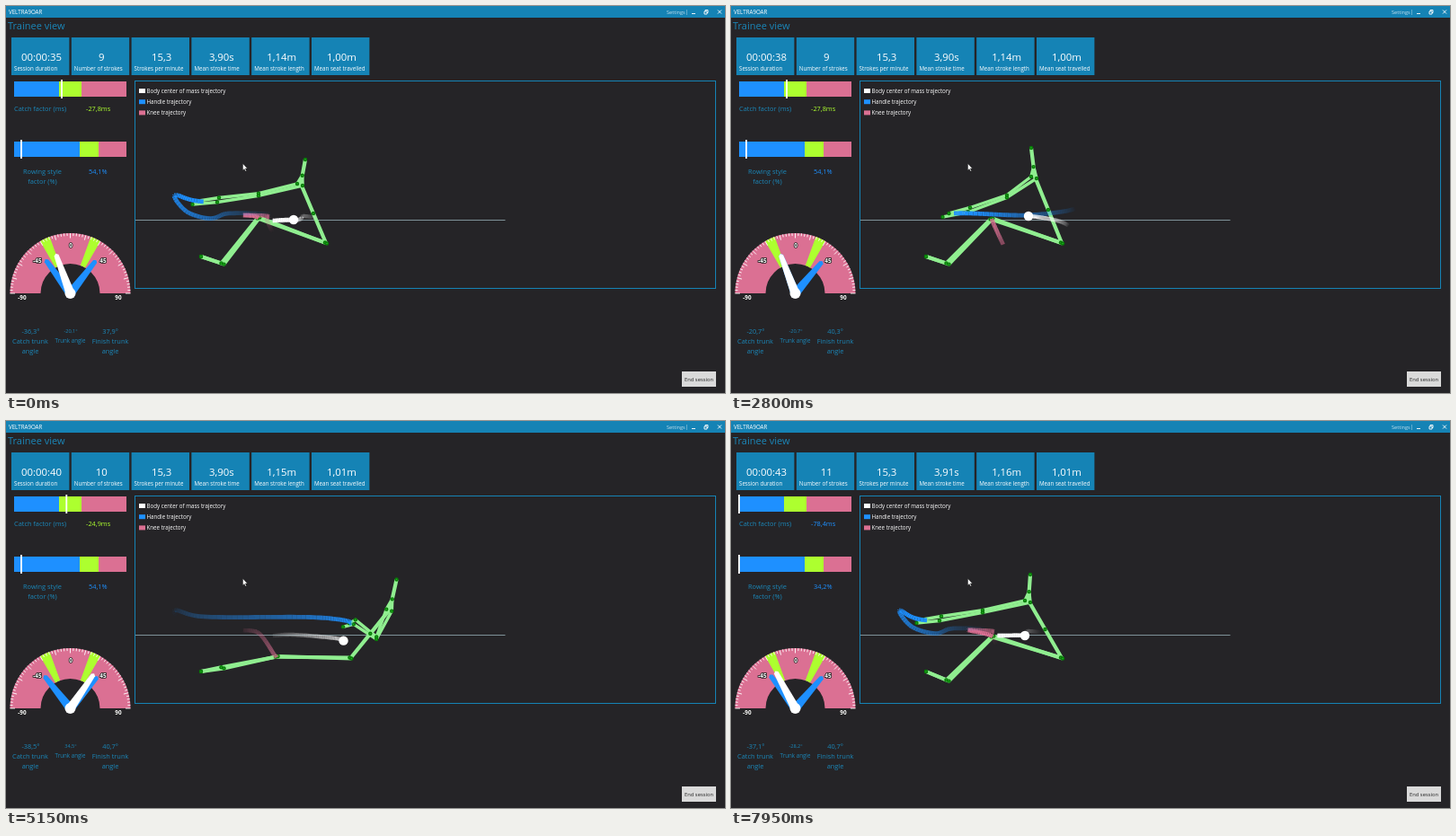
An HTML page with a canvas for the animation above (8 s loop, 800 px wide and 431 px high).

```html
<!DOCTYPE html>
<html lang="en">
<head>
<meta charset="utf-8">
<title>Trainee view</title>
<style>
  html, body { margin: 0; width: 100%; height: 100%; overflow: hidden; background: #252427; }
  svg, canvas { position: absolute; left: 0; top: 0; width: 800px; height: 431px; }
  text { font-family: "Open Sans", "Noto Sans", sans-serif; font-size: 7.4px; fill: #1b87b9; }
  .mid { text-anchor: middle; }
  .white { fill: #fff; }
  .num { font-size: 11.4px; }
  .small { font-size: 6.2px; }
  .tiny { font-size: 5.6px; }
  .dial { font-size: 6.4px; font-weight: 700; fill: #fff; stroke: #222; stroke-width: 1.6px; paint-order: stroke; }
</style>
</head>
<body>
<svg id="ui" viewBox="0 0 800 431"></svg>
<canvas id="chart" width="800" height="431"></canvas>
<script>
const BLUE = '#1e90ff', GREEN = '#adff2f', PINK = '#db7093', ACCENT = '#1583b5';
const LOOP = 8000, STEP = 50, TRAIL = 1650;
const CX = 71.5, CY = 320;

// ---------- static interface ----------
const rect = (x, y, w, h, fill, extra = '') =>
  `<rect x="${x}" y="${y}" width="${w}" height="${h}" fill="${fill}" ${extra}/>`;
const text = (x, y, str, cls = '', id = '') =>
  `<text x="${x}" y="${y}" class="${cls}" ${id && `id="${id}"`}>${str}</text>`;
const polar = (r, deg) => {
  const a = deg * Math.PI / 180;
  return [CX + r * Math.sin(a), CY - r * Math.cos(a)];
};
const sector = (from, to, fill) =>
  `<path fill="${fill}" d="M${polar(67, from)}A67 67 0 0 1 ${polar(67, to)}` +
  `L${polar(33, to)}A33 33 0 0 0 ${polar(33, from)}Z"/>`;
const needle = (id, fill) =>
  `<path id="${id}" fill="${fill}" d="M${CX - 5} ${CY}L${CX - 2.6} ${CY - 45}L${CX} ${CY - 47}L${CX + 2.6} ${CY - 45}L${CX + 5} ${CY}Z"/>`;

function bar(y, greenFrom, greenTo, id) {
  return rect(9, y, greenFrom - 9, 17, BLUE) +
    rect(greenFrom, y, greenTo - greenFrom, 17, GREEN) +
    rect(greenTo, y, 134 - greenTo, 17, PINK) +
    rect(-0.9, y - 2, 1.8, 21, '#fff', `id="${id}"`);
}

function gauge() {
  let out = sector(-90, 90, PINK) + sector(-30, -20, GREEN) + sector(20, 30, GREEN);
  for (let deg = -90; deg <= 90; deg += 3) {
    const inner = deg % 15 ? 64 : 61.5;
    out += `<path stroke="#fff" stroke-width=".9" d="M${polar(inner, deg)}L${polar(67, deg)}"/>`;
  }
  return out + needle('catchNeedle', BLUE) + needle('finishNeedle', BLUE) + needle('trunkNeedle', '#fff') +
    `<circle cx="${CX}" cy="${CY}" r="6" fill="#fff"/>` +
    text(18, 327, '-90', 'dial mid') + text(35, 286, '-45', 'dial mid') + text(72, 269, '0', 'dial mid') +
    text(108, 286, '45', 'dial mid') + text(125, 327, '90', 'dial mid');
}

const tiles = [['clock', 'Session duration'], ['strokes', 'Number of strokes'], ['rate', 'Strokes per minute'],
  ['time', 'Mean stroke time'], ['length', 'Mean stroke length'], ['seat', 'Mean seat travelled']];
const legend = [['#fff', 'Body center of mass trajectory'], [BLUE, 'Handle trajectory'], [PINK, 'Knee trajectory']];

document.getElementById('ui').innerHTML =
  rect(0, 0, 800, 13, ACCENT) +
  text(3, 9, 'VELTRA9OAR', 'small white') +
  `<g opacity=".75">${text(735, 9, 'Settings', 'tiny white')}${rect(757, 4, .6, 6, '#bfe0ee')}</g>` +
  `<g fill="none" stroke="#fff" stroke-width=".9"><path d="M763 8.5h4M792 4.5l4 4m0-4l-4 4"/>
   <path d="M777 6h3v3h-3zM778 6v-1.500h3v3h-1"/></g>` +
  `<text x="2" y="26" style="font-size:11px">Trainee view</text>` +
  tiles.map(([id, label], i) => {
    const x = 6 + i * 66.8;
    return rect(x, 35, 64.4, 42, ACCENT) + text(x + 33.5, 61, '', 'num white mid', id) +
      text(x + 3, 72, label, 'small white');
  }).join('') +
  bar(84, 59, 84, 'catchMark') + text(9, 117, 'Catch factor (ms)') + text(89, 117, '', '', 'catchFactor') +
  bar(151, 82, 103, 'styleMark') + text(40.500, 187, 'Rowing style', 'mid') + text(40.5, 198, 'factor (%)', 'mid') +
  `<text x="92" y="187" id="styleFactor" style="fill:${BLUE}"></text>` +
  gauge() +
  text(27.500, 365, '', 'mid', 'catchAngle') + text(27, 376, 'Catch trunk', 'mid') + text(27, 387, 'angle', 'mid') +
  text(72, 363.5, '', 'mid tiny', 'trunkAngle') + text(71.500, 374.5, 'Trunk angle', 'mid small') +
  text(116, 365, '', 'mid', 'finishAngle') + text(116, 376, 'Finish trunk', 'mid') + text(116, 387, 'angle', 'mid') +
  rect(143.5, 83.5, 646, 231, 'none', `stroke="${ACCENT}"`) +
  legend.map(([fill, label], i) =>
    rect(148, 92 + i * 12.2, 7, 5, fill) + text(156.5, 97 + i * 12.2, label, 'small white')).join('') +
  rect(144, 238, 411.5, 1, '#7f9298') +
  `<path d="M263.500 175.500v7.500l1.700-1.500 1.100 2.500 1.200-.6-1.100-2.400h2.200z" fill="#fff" stroke="#111" stroke-width=".4"/>` +
  rect(752, 407, 38, 17, '#dadada') +
  `<text x="771" y="418" class="mid" style="font-size:5.8px;fill:#222">End session</text>`;

// ---------- motion ----------
// ankle y, hip x, then x,y of knee, shoulder, head, elbow, wrist, hand, centre of mass
const poses = {
  start:   [287, 356, 281, 236, 328, 198, 333, 171, 281, 210, 236, 216, 211, 219, 320, 238],
  restart: [289, 368, 291, 240, 331, 200, 333, 171, 280, 212, 233, 220, 210, 223, 327, 239],
  drive:   [281, 381, 299, 261, 415, 204, 424, 171, 387, 225, 351, 218, 337, 219, 367, 242],
  finish:  [274, 383, 301, 262, 429, 211, 437, 178, 413, 243, 389, 223, 381, 226, 376, 245],
  recover: [288, 385, 302, 264, 397, 192, 398, 157, 383, 218, 347, 229, 321, 235, 363, 239],
  slide:   [287, 368, 290, 237, 338, 190, 334, 158, 307, 212, 265, 227, 239, 233, 331, 234],
  reach:   [289, 369, 292, 234, 327, 200, 324, 169, 290, 221, 237, 236, 221, 237, 326, 238],
  dip:     [288, 357, 274, 233, 309, 204, 307, 173, 266, 218, 216, 229, 193, 229, 307, 239],
  catch:   [287, 349, 264, 233, 297, 206, 298, 176, 249, 212, 205, 211, 178, 211, 297, 239]
};
const timeline = [[-2000, 'recover'], [-1150, 'slide'], [-800, 'reach'], [-580, 'dip'], [-380, 'catch'], [0, 'start'],
  [600, 'drive'], [1100, 'finish'], [1950, 'recover'], [2800, 'slide'], [3130, 'reach'], [3360, 'dip'],
  [3600, 'catch'], [3950, 'start'], [4500, 'drive'], [5050, 'finish'], [5850, 'recover'], [6650, 'slide'],
  [7050, 'reach'], [7300, 'dip'], [7550, 'catch'], [7950, 'restart'], [8500, 'drive']]
  .map(([time, name]) => ({ time, pose: poses[name] }));
const trunkKeys = [[-400, -36.3], [0, -20.1], [600, 29.5], [900, 40.3], [1100, 37.9], [1950, 9.6], [2800, -20.7],
  [3150, -31], [3600, -38.5], [3950, -22], [4500, 29.8], [4850, 40.7], [5050, 38], [5850, 9.6], [6650, -20.7],
  [7050, -31.1], [7550, -37.1], [7950, -28.2], [8500, 29]];

function slope(i, j) {
  const a = timeline[Math.max(i - 1, 0)], b = timeline[Math.min(i + 1, timeline.length - 1)];
  return (b.pose[j] - a.pose[j]) / (b.time - a.time);
}

function poseAt(t) {
  let i = 0;
  while (i < timeline.length - 2 && timeline[i + 1].time <= t) i++;
  const a = timeline[i], b = timeline[i + 1], d = b.time - a.time, u = (t - a.time) / d;
  const v = a.pose.map((p, j) => {
    const q = b.pose[j], h = u * u * (3 - 2 * u);
    return p + (q - p) * h + d * u * (1 - u) * ((1 - u) * slope(i, j) - u * slope(i + 1, j));
  });
  const pt = k => [v[k], v[k + 1]];
  const joints = { toe: [217, 279], ankle: [241, v[0]], hip: [v[1], 264], knee: pt(2), shoulder: pt(4),
    head: pt(6), elbow: pt(8), wrist: pt(10), hand: pt(12), mass: pt(14) };
  joints.handle = mix(joints.hand, joints.wrist, .35);
  return joints;
}

function trunkAt(t) {
  const i = trunkKeys.findIndex(k => k[0] > t);
  const [t0, a] = trunkKeys[i - 1], [t1, b] = trunkKeys[i];
  return a + (b - a) * (t - t0) / (t1 - t0);
}

// Extremes follow the trunk on its way out and hold on its way back.
function trunkState(t) {
  let now = trunkAt(0), catchA = -36.3, finishA = 37.9;
  for (let s = STEP; s <= t; s += STEP) {
    const next = trunkAt(s);
    if (next < 0 && next < now) catchA = next;
    if (next > 0 && next > now) finishA = next;
    now = next;
  }
  return { trunk: now, catch: catchA, finish: finishA };
}

const mix = (a, b, k) => [a[0] + (b[0] - a[0]) * k, a[1] + (b[1] - a[1]) * k];
const shift = (p, x, y) => [p[0] + x, p[1] + y];

// ---------- drawing ----------
const ctx = document.getElementById('chart').getContext('2d');

function line(points, color, width) {
  ctx.strokeStyle = color;
  ctx.lineWidth = width;
  ctx.beginPath();
  points.forEach(p => ctx.lineTo(...p));
  ctx.stroke();
}

function dot(p, r, color) {
  ctx.fillStyle = color;
  ctx.beginPath();
  ctx.arc(p[0], p[1], r, 0, 7);
  ctx.fill();
}

function skeleton(j, shin) {
  const flesh = '#90ee90';
  const neck = mix(j.shoulder, j.head, .34), spine = mix(j.hip, j.shoulder, .5);
  const arms = [-1, 1].map(s => [shift(j.shoulder, s * 3 - 1, s + 1), shift(j.elbow, 0, s * 1.3),
    shift(j.wrist, -s, s * 2.5), shift(j.hand, -s * 3.5, s * 2)]);
  const legs = [-1, 1].map(s => [j.toe, shift(j.ankle, s * 1.5, s * .6), shift(j.knee, s * 1.3, -s * .4), shift(j.hip, s, s * .5)]);
  ctx.lineJoin = 'round';
  line([j.hip, spine, j.shoulder, neck, j.head], flesh, 4.2);
  line([arms[0][0], neck, arms[1][0]], flesh, 3.6);
  arms.forEach(a => line(a, flesh, 3.4));
  legs.forEach(l => {
    line(l.slice(2), flesh, 4);
    line(l.slice(0, 3), shin || flesh, 4);
  });
  [j.head, neck, spine, ...arms.flat(), ...legs.flat()].forEach(p => {
    dot(p, 2.2, '#087a08');
    dot(p, .8, '#22b422');
  });
}

function trail(track, name, color, width) {
  track.forEach((p, i) => {
    if (!i) return;
    ctx.globalAlpha = Math.min(1, 1.15 * i / track.length);
    line([track[i - 1][name], p[name]], color, width);
  });
  ctx.globalAlpha = 1;
}

const el = id => document.getElementById(id);
const put = (id, str) => { if (el(id).textContent !== str) el(id).textContent = str; };
const degrees = a => a.toFixed(1).replace('.', ',') + '°';
const strokes = [
  { until: 3750, strokes: '9', time: '3,90s', length: '1,14m', seat: '1,00m', lag: '-27,8ms', lagX: 62, style: '54,1%', styleX: 17 },
  { until: 7750, strokes: '10', time: '3,90s', length: '1,15m', seat: '1,01m', lag: '-24,9ms', lagX: 67.3, style: '54,1%', styleX: 17 },
  { until: LOOP, strokes: '11', time: '3,91s', length: '1,16m', seat: '1,01m', lag: '-78,4ms', lagX: 9, style: '34,2%', styleX: 9 }
];

function render(t) {
  const s = strokes.find(x => t < x.until);
  put('clock', '00:00:' + Math.floor(35.25 + t / 1000));
  ['strokes', 'time', 'length', 'seat'].forEach(k => put(k, s[k]));
  put('rate', '15,3');
  put('catchFactor', s.lag);
  el('catchFactor').style.fill = s.lagX > 50 ? GREEN : BLUE;
  put('styleFactor', s.style);
  el('catchMark').setAttribute('transform', `translate(${s.lagX})`);
  el('styleMark').setAttribute('transform', `translate(${s.styleX})`);

  const angles = trunkState(t);
  for (const k in angles) {
    put(k + 'Angle', degrees(angles[k]));
    el(k + 'Needle').setAttribute('transform', `rotate(${angles[k]} ${CX} ${CY})`);
  }

  const track = [];
  for (let past = t - TRAIL; past <= t; past += 25) track.push(poseAt(past));
  const now = poseAt(t);
  ctx.clearRect(0, 0, 800, 431);
  skeleton(now, t >= 6950 && t < 7150 ? '#e4f02c' : '');
  trail(track, 'knee', PINK, 4.6);
  trail(track, 'handle', BLUE, 4.8);
  trail(track, 'mass', '#fff', 4.4);
  dot(now.mass, 5.2, '#fff');
}

const begin = performance.now();
function tick() {
  const t = (performance.now() - begin) % LOOP;
  render(Math.floor(t / STEP) * STEP);
  requestAnimationFrame(tick);
}
tick();
</script>
</body>
</html>
```
